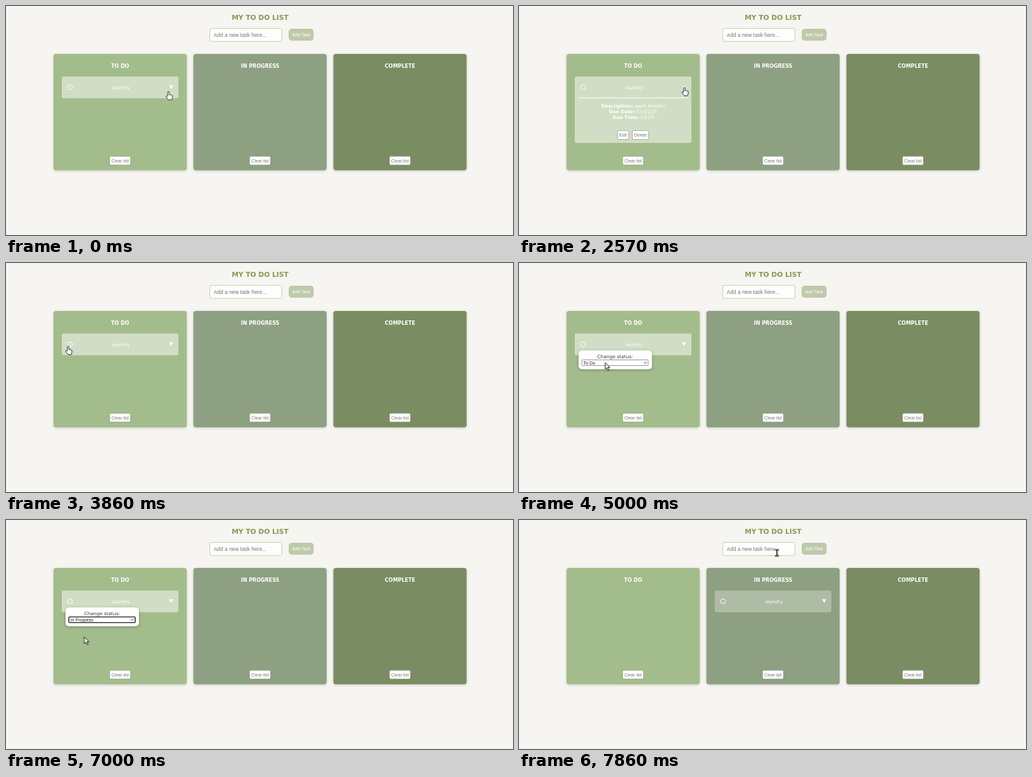
Animation, 800 px wide and 363 px high, one loop 8 s. Source, as an HTML page:

```html
<!DOCTYPE html>
<html lang="en">
<head>
<meta charset="utf-8">
<title>My to do list</title>
<style>
html, body { margin: 0; width: 100%; height: 100%; overflow: hidden; background: #f6f5f1; }
svg { display: block; width: 800px; height: 363px; }
text { font: 7.3px "DejaVu Sans", Verdana, sans-serif; }
.mid { text-anchor: middle; }
.bold, .head { font-weight: bold; }
.head { font-size: 8px; text-anchor: middle; }
.ui { font: 7.1px "Liberation Sans", Arial, sans-serif; }
.white { fill: #fff; }
.btn rect { fill: #fff; stroke: #8b9280; stroke-width: .7; }
.btn text { fill: #777; text-anchor: middle; }
.column { filter: drop-shadow(0 1px 2px rgba(0, 0, 0, .16)); }
.pop { filter: drop-shadow(0 1px 2px rgba(0, 0, 0, .3)); }

.anim { animation: 8s step-end -4ms infinite; }
#card { animation-name: card; }
#moved { animation-name: moved; }
#closed { animation-name: closed; }
#open { animation-name: open; }
#popup { animation-name: popup; }
#menu { animation-name: menu; }
#before { animation-name: before; }
#after { animation-name: after; }
#mark { animation-name: mark; }
#opt0 { animation-name: opt0; }
#opt1 { animation-name: opt1; }
#cursor { animation-name: path; }
#hand { animation-name: hand; }
#arrow { animation-name: arrow; }
#beam { animation-name: beam; }

@keyframes card { 0% { opacity: 1 } 89.286%, 100% { opacity: 0 } }
@keyframes moved { 0% { opacity: 0 } 89.286%, 100% { opacity: 1 } }
@keyframes closed { 0% { opacity: 1 } 10.714% { opacity: 0 } 35.714%, 100% { opacity: 1 } }
@keyframes open { 0% { opacity: 0 } 10.714% { opacity: 1 } 35.714%, 100% { opacity: 0 } }
@keyframes popup { 0% { opacity: 0 } 50% { opacity: 1 } 89.286%, 100% { opacity: 0 } }
@keyframes menu { 0% { opacity: 0 } 66.071% { opacity: 1 } 82.143%, 100% { opacity: 0 } }
@keyframes before { 0% { opacity: 1 } 82.143%, 100% { opacity: 0 } }
@keyframes after { 0% { opacity: 0 } 82.143%, 100% { opacity: 1 } }
@keyframes mark { 0% { transform: none } 71.429%, 100% { transform: translateY(12.6px) } }
@keyframes opt0 { 0% { fill: #fff } 71.429%, 100% { fill: #222 } }
@keyframes opt1 { 0% { fill: #222 } 71.429%, 100% { fill: #fff } }
@keyframes hand { 0% { opacity: 1 } 37.5% { opacity: 0 } 48.214% { opacity: 1 } 58.929%, 100% { opacity: 0 } }
@keyframes arrow { 0% { opacity: 0 } 37.5% { opacity: 1 } 48.214% { opacity: 0 } 58.929% { opacity: 1 } 98.214%, 100% { opacity: 0 } }
@keyframes beam { 0% { opacity: 0 } 98.214%, 100% { opacity: 1 } }
@keyframes path {
  0% { transform: translate(256.5px, 135.5px); animation-timing-function: steps(4) }
  7.143% { transform: translate(262px, 128px) }
  23.214% { transform: translate(261.5px, 128.5px) }
  25% { transform: translate(261px, 129px) }
  35.714% { transform: translate(261px, 129px); animation-timing-function: steps(7) }
  48.214% { transform: translate(98px, 132px) }
  50% { transform: translate(98px, 132px); animation-timing-function: steps(2) }
  53.571% { transform: translate(99px, 133px) }
  55.357% { transform: translate(99px, 133px); animation-timing-function: steps(4) }
  62.5% { transform: translate(136px, 158px) }
  66.071% { transform: translate(136px, 158px); animation-timing-function: steps(3) }
  71.429% { transform: translate(127px, 178px); animation-timing-function: steps(2) }
  75% { transform: translate(126px, 180px) }
  85.714% { transform: translate(125px, 183px) }
  87.5% { transform: translate(123.5px, 185.5px) }
  89.286% { transform: translate(163px, 151px) }
  91.071% { transform: translate(163px, 151px); animation-timing-function: steps(4) }
  98.214%, 100% { transform: translate(407px, 46.5px) }
}
</style>
</head>
<body>
<svg viewBox="0 0 800 363">
  <defs>
    <g id="clear" class="btn">
      <rect x="163.5" y="238.2" width="33" height="13.8" rx="2"/>
      <text class="ui" x="180" y="247.6">Clear list</text>
    </g>
    <g id="label">
      <circle cx="101" cy="128.9" r="3.9" fill="none" stroke="#fff"/>
      <text class="white mid" x="181.7" y="131.7">laundry</text>
    </g>
    <path id="down" d="M257.3 125.6h6.6l-3.3 5.8z" fill="#fff"/>
  </defs>

  <rect width="800" height="363" fill="#f6f5f1"/>
  <text class="head" x="401" y="21.8" fill="#839c55" style="font-size:10.7px">MY TO DO LIST</text>
  <rect x="321.7" y="35.6" width="113.6" height="20.6" rx="1.5" fill="#fdfefd" stroke="#bccb9f" stroke-width=".9"/>
  <text class="ui" x="327.7" y="48.5" fill="#757575" style="font-size:8.4px">Add a new task here...</text>
  <rect x="446" y="36" width="39.5" height="19" rx="5" fill="#bfcaa9"/>
  <text class="ui white mid" x="465.8" y="48" style="font-size:6.9px">Add Task</text>

  <rect class="column" x="75" y="76" width="210.2" height="184.6" rx="4" fill="#a3bc8b"/>
  <rect class="column" x="295.7" y="76" width="210.2" height="184.6" rx="4" fill="#8da081"/>
  <rect class="column" x="516.6" y="76" width="210.2" height="184.6" rx="4" fill="#7a8d62"/>
  <text class="head white" x="180.1" y="98.3">TO DO</text>
  <text class="head white" x="401" y="98.3">IN PROGRESS</text>
  <text class="head white" x="621.7" y="98.3">COMPLETE</text>
  <use href="#clear"/>
  <use href="#clear" x="220.8"/>
  <use href="#clear" x="441.6"/>

  <g id="card" class="anim">
    <g id="closed" class="anim">
      <rect x="88" y="111.7" width="184" height="34.6" rx="2.5" fill="#fff" fill-opacity=".5"/>
      <use href="#down"/>
    </g>
    <g id="open" class="anim">
      <rect x="88" y="111.7" width="184" height="105.3" rx="2.5" fill="#fff" fill-opacity=".5"/>
      <path d="M257.8 131h6l-3-5.6z" fill="#fff"/>
      <path d="M93.5 145.5H268" stroke="#fff"/>
      <g class="white">
        <text class="mid" x="180" y="160.7"><tspan class="bold">Description:</tspan> wash sheets!</text>
        <text class="mid" x="180" y="170"><tspan class="bold">Due Date:</tspan> 07/01/25</text>
        <text class="mid" x="180" y="179.2"><tspan class="bold">Due Time:</tspan> 19:25</text>
      </g>
      <g class="btn">
        <rect x="155.4" y="197.6" width="17.6" height="14" rx="2"/>
        <text class="ui" x="164.2" y="207">Edit</text>
        <rect x="179" y="197.6" width="25.6" height="14" rx="2"/>
        <text class="ui" x="191.8" y="207">Delete</text>
      </g>
    </g>
    <use href="#label"/>
  </g>

  <g id="moved" class="anim">
    <g transform="translate(220.9)">
      <rect x="88" y="111.7" width="184" height="34.6" rx="2.5" fill="#fff" fill-opacity=".29"/>
      <use href="#down"/>
      <use href="#label"/>
    </g>
  </g>

  <g id="popup" class="anim">
    <rect class="pop" x="94" y="138.6" width="115.8" height="29.8" rx="5" fill="#fff"/>
    <text class="mid" x="151.7" y="151.2" fill="#354222" style="font-size:7.45px">Change status:</text>
    <g id="before" class="anim">
      <rect x="99.2" y="153.6" width="104.6" height="9" rx="1" fill="#fff" stroke="#777" stroke-width=".8"/>
      <text class="ui" x="101.6" y="160.6" fill="#222">To Do</text>
    </g>
    <g id="after" class="anim">
      <rect x="99.2" y="153.6" width="104.6" height="9" rx="1" fill="#fff" stroke="#161a20" stroke-width="1.4"/>
      <text class="ui" x="101.6" y="160.6" fill="#222">In Progress</text>
    </g>
    <path d="M197.5 157.2l1.9 1.9 1.9-1.9" fill="none" stroke="#222"/>
    <g id="menu" class="anim">
      <rect x="99" y="163.2" width="104.8" height="38.6" fill="#fff" stroke="#888" stroke-width=".8"/>
      <rect id="mark" class="anim" x="99.4" y="163.6" width="104" height="12.6" fill="#2064c8"/>
      <text id="opt0" class="ui anim" x="101.8" y="171.9">To Do</text>
      <text id="opt1" class="ui anim" x="101.8" y="184.6">In Progress</text>
      <text class="ui" x="101.8" y="197.2" fill="#222">Complete</text>
    </g>
  </g>

  <g id="cursor" class="anim" stroke-linejoin="round">
    <path id="hand" class="anim" fill="#fff" stroke="#111" stroke-width=".9"
      d="M-1.2 7.5V1.2a1.2 1.2 0 0 1 2.4 0V5.2q1-.8 1.8.3q1-.6 1.7.4q1.3-.3 1.3 1v2.6L5 13.3H0L-3.8 8.6q-.4-1.5 1-1.3z"/>
    <path id="arrow" class="anim" fill="#fff" stroke="#111" stroke-width=".95"
      d="M0 0V10.3L2.4 8.1 4.2 12.2 5.9 11.4 4.2 7.5H7.3z"/>
    <path id="beam" class="anim" fill="none" stroke="#3a3d3c" stroke-width="1.9"
      d="M-3.2 .5H3.2M0 .5V10.3M-3.2 10.3H3.2"/>
  </g>
</svg>
</body>
</html>
```
